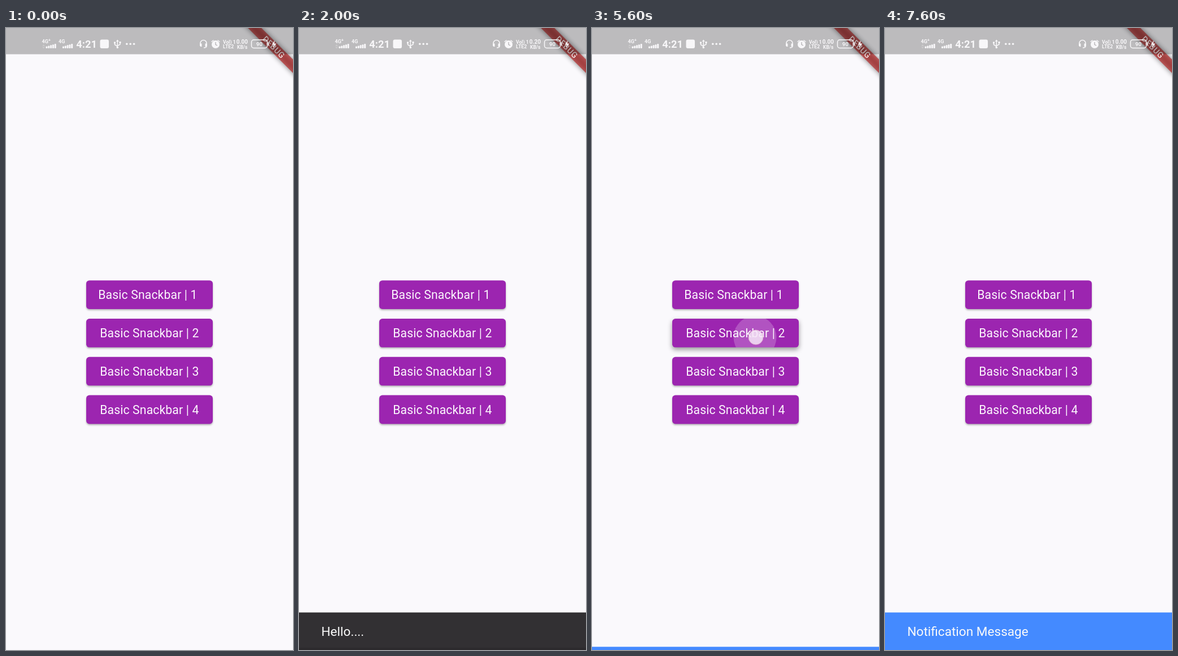
An HTML page for the animation above (8000 ms loop, 508 by 1102 pixels).

```html
<!DOCTYPE html>
<html lang="en">
<head>
<meta charset="utf-8">
<title>Snackbar demo</title>
<style>
  html, body { margin: 0; height: 100%; overflow: hidden; background: #faf9fc; }
  svg { display: block; width: 100vw; height: 100vh; font-family: Roboto, sans-serif; }
  text { white-space: pre; }
  .label { font-size: 21.17px; letter-spacing: .14px; fill: #fbf6fc; }
  .face { fill: #9c25b0; filter: drop-shadow(0 2px 1.5px rgba(0,0,0,.28)); }
  .face.pressed { filter: drop-shadow(0 4px 4px rgba(0,0,0,.4)); }
  .snack text { font-size: 22.58px; fill: #fafafa; }
  .status { fill: #f8f7f9; font-weight: 700; }
  .line { fill: none; stroke: #f8f7f9; stroke-width: 1.5; }
</style>
</head>
<body>
<svg viewBox="0 0 508 1102">
  <defs>
    <filter id="blur" x="-50%" y="-200%" width="200%" height="500%"><feGaussianBlur stdDeviation="4.8"/></filter>
    <clipPath id="buttonClip"><rect id="clipRect" x="142" width="224" height="50.8" rx="5.6"/></clipPath>
  </defs>
  <rect width="508" height="1102" fill="#faf9fc"/>

  <g id="buttons"></g>
  <g clip-path="url(#buttonClip)"><circle id="ripple" fill="#fff"/></g>
  <g id="labels"></g>

  <g class="snack" id="dark">
    <rect y="1035.5" width="508" height="67" fill="#323033"/>
    <rect y="1098" width="508" height="4" fill="#2c2a2d"/>
    <text x="39.5" y="1076.5">Hello....</text>
  </g>
  <g class="snack" id="blue">
    <rect y="1035.5" width="508" height="67" fill="#448aff"/>
    <text x="39.5" y="1076.5">Notification Message</text>
  </g>

  <g transform="translate(508) rotate(45)">
    <rect x="-80" y="39.5" width="160" height="16.9" opacity=".5" filter="url(#blur)"/>
    <rect x="-80" y="39.5" width="160" height="16.9" fill="#b71c1c" fill-opacity=".63"/>
    <text y="53.1" text-anchor="middle" font-size="14.4" font-weight="500" letter-spacing=".6" fill="#fff" fill-opacity=".85">DEBUG</text>
  </g>
  <rect width="508" height="46.5" fill-opacity=".25"/>

  <g class="status">
    <text x="63.5" y="27" font-size="9">4G</text>
    <text x="75" y="24" font-size="7">+</text>
    <text x="93" y="27" font-size="9">4G</text>
    <g id="bars"></g>
    <path id="arrows" d="M64 32l2.5-3 2.5 3zM64 33.5h5l-2.5 3z"/>
    <text x="124.3" y="34.6" font-size="18.3">4:21</text>
    <rect x="166.5" y="20.5" width="15.5" height="15.5" rx="3"/>
    <path class="line" d="M197.3 22v13M192.5 26v3.5l4.8 3M202 25.5v3.5l-4.7 2.5"/>
    <path d="M194.8 24l2.5-3.5 2.5 3.5zM191 24.5h3v3h-3zM200.5 24h3v3h-3z"/>
    <circle cx="197.3" cy="34.5" r="1.8"/>
    <circle cx="213.8" cy="28.3" r="1.8"/><circle cx="220.2" cy="28.3" r="1.8"/><circle cx="226.6" cy="28.3" r="1.8"/>
    <path class="line" d="M344 29v-2a5.5 5.5 0 0 1 11 0v5q0 3-5 3"/>
    <path d="M343 27.5h3.5v5.5h-2q-1.500-1-1.500-2zM356 27.500h-3.500v5.500h2q1.500-1 1.500-2z"/>
    <circle cx="371" cy="29" r="7"/>
    <path class="line" d="M363.500 24.500l4-3M378.500 24.500l-4-3"/>
    <path d="M371 25v4.500l3 1.500" fill="none" stroke="#b2b0b3" stroke-width="1.300"/>
    <text x="384" y="27.600" font-size="8.600">Vol) 1</text>
    <text x="384" y="35.800" font-size="8.800">LTE2</text>
    <text id="rate" x="407.800" y="27.600" font-size="10"></text>
    <text x="409" y="36.500" font-size="8.500">KB/s</text>
    <rect class="line" x="434.500" y="21" width="28" height="14.500" rx="4"/>
    <path d="M464 26h1.500v5h-1.500zM475.500 22l-5 7.500h3.500l-1.500 6 6-8h-3.500z"/>
    <text x="448.500" y="31.800" font-size="9.500" text-anchor="middle">90</text>
  </g>

  <circle id="dot" r="13" fill="#f6e6f7" fill-opacity=".85" stroke="#dba0c4" stroke-opacity=".7"/>
</svg>
<script>
const $ = id => document.getElementById(id);
const LOOP = 8000, STEP = 100, SNACK_HEIGHT = 66.5;
const taps = [{ at: 500, row: 0 }, { at: 5500, row: 1 }];
const rowY = i => 447.2 + 67.8 * i;
const clamp = v => Math.min(1, Math.max(0, v));
const mix = (a, b, k) => a + (b - a) * k;

// cubic-bezier(.4, 0, .2, 1)
function ease(x) {
  let lo = 0, hi = 1;
  for (let i = 0; i < 24; i++) {
    const s = (lo + hi) / 2, r = 1 - s;
    if (1.2 * r * r * s + .6 * r * s * s + s ** 3 < x) lo = s; else hi = s;
  }
  return 3 * (1 - lo) * lo * lo + lo ** 3;
}

function add(parent, tag, attrs, text = '') {
  const el = document.createElementNS('http://www.w3.org/2000/svg', tag);
  for (const key in attrs) el.setAttribute(key, attrs[key]);
  el.textContent = text;
  return $(parent).appendChild(el);
}

function set(id, attrs) {
  for (const key in attrs) $(id).setAttribute(key, attrs[key]);
}

const faces = [0, 1, 2, 3].map(i => {
  add('labels', 'text', { class: 'label', x: i ? 166.2 : 163.3, y: rowY(i) + 33 }, `Basic Snackbar | ${i + 1}`);
  return add('buttons', 'rect', { class: 'face', x: 142, y: rowY(i), width: 224, height: 50.8, rx: 5.6 });
});

for (const x of [70.5, 100])
  for (let i = 0; i < 5; i++) {
    const height = 3.5 + i * 1.1;
    add('bars', 'rect', { x: x + i * 3.8, y: 36 - height, width: 3, height, rx: 1 });
  }

function drawTap(t) {
  const tap = taps.find(p => t >= p.at && t < p.at + 600);
  const age = tap ? t - tap.at : 0;
  const y = tap ? rowY(tap.row) : 0;
  const grow = ease(clamp((age - 100) / 200));
  const alpha = tap ? .21 * Math.min(1, (age + 50) / 100, (600 - age) / 300) : 0;

  faces.forEach((face, i) => face.classList.toggle('pressed', !!tap && i === tap.row && age >= 100 && age < 300));
  set('clipRect', { y });
  set('ripple', {
    cx: mix(288.5, 254, grow), cy: mix(y + 33, y + 25.4, grow),
    r: mix(35 + Math.min(age, 100) * .03, 118, grow), opacity: alpha
  });
  set('dot', { cx: 290, cy: y + 33, opacity: tap && age < 200 ? 1 : 0 });
}

function drawSnack(id, t, start, end) {
  const enter = clamp((t - start) / 240);
  const shown = Math.min(enter, clamp(1 - (t - end) / 250));
  set(id, {
    transform: `translate(0 ${SNACK_HEIGHT * (1 - ease(shown))})`,
    visibility: shown > 0 ? 'visible' : 'hidden'
  });
  $(id).querySelector('text').setAttribute('opacity', ease(clamp((enter - .72) / .28)));
}

function draw(now) {
  const t = Math.floor((now % LOOP) / STEP) * STEP;
  drawTap(t);
  drawSnack('dark', t, 560, 4877);
  drawSnack('blue', t, 5560, Infinity);
  set('arrows', { opacity: t >= 800 && t < 1800 ? 1 : .25 });
  $('rate').textContent = t >= 2000 && t < 5000 ? '0.20' : '0.00';
  requestAnimationFrame(draw);
}
draw(0);
</script>
</body>
</html>
```
